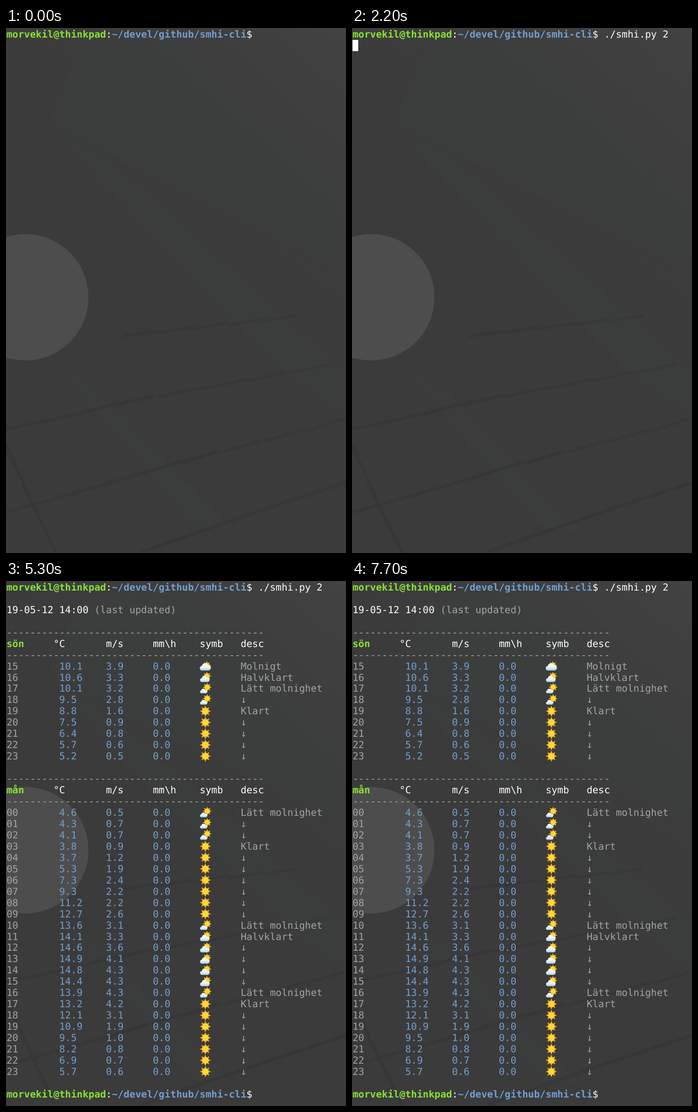
Animation, 602 px wide and 930 px high, one loop 8100 ms. Source, as an HTML page with a canvas:

```html
<!DOCTYPE html>
<html lang="sv">
<head>
<meta charset="utf-8">
<title>Terminal forecast</title>
<style>
html, body { margin: 0; width: 100%; height: 100%; overflow: hidden; background: #3b3c3b; }
canvas { display: block; width: 602px; height: 930px; }
</style>
</head>
<body>
<canvas id="stage" width="602" height="930"></canvas>
<script>
const W = 602, H = 930, LOOP = 8100;
const CELL = 10.36, ROW = 19.955, FONT = '17.2px "DejaVu Sans Mono", monospace';
const GREEN = '#8ae234', BLUE = '#729fcf', WHITE = '#ffffff', GREY = '#a3a3a3';
const ctx = document.getElementById('stage').getContext('2d');

const SKIES = { c: 'Molnigt', h: 'Halvklart', l: 'Lätt molnighet', s: 'Klart' };

// Each entry: temperature, wind, sky
const DAYS = [
  { name: 'sön', row: 4, hour: 15, data:
    '10.1 3.9 c,10.6 3.3 h,10.1 3.2 l,9.5 2.8 l,8.8 1.6 s,7.5 0.9 s,6.4 0.8 s,5.7 0.6 s,5.2 0.5 s' },
  { name: 'mån', row: 17, hour: 0, data:
    '4.6 0.5 l,4.3 0.7 l,4.1 0.7 l,3.8 0.9 s,3.7 1.2 s,5.3 1.9 s,7.3 2.4 s,9.3 2.2 s,' +
    '11.2 2.2 s,12.7 2.6 s,13.6 3.1 l,14.1 3.3 h,14.6 3.6 h,14.9 4.1 h,14.8 4.3 h,14.4 4.3 h,' +
    '13.9 4.3 l,13.2 4.2 s,12.1 3.1 s,10.9 1.9 s,9.5 1.0 s,8.2 0.8 s,6.9 0.7 s,5.7 0.6 s' }
];

const colX = col => 1 + col * CELL;
const rowY = row => 1 + row * ROW;

function put(text, col, row, color, bold) {
  ctx.font = (bold ? 'bold ' : '') + FONT;
  ctx.fillStyle = color;
  [...text].forEach((ch, i) => {
    if (ch !== ' ') ctx.fillText(ch, colX(col + i), rowY(row) + 15.9);
  });
}

function prompt(row) {
  put('morvekil@thinkpad', 0, row, GREEN, true);
  put(':', 17, row, WHITE);
  put('~/devel/github/smhi-cli', 18, row, BLUE, true);
  put('$', 41, row, WHITE);
}

function cursor(col, row) {
  ctx.fillStyle = WHITE;
  ctx.fillRect(Math.floor(colX(col)), Math.round(rowY(row)), col ? 11 : 10, 20);
}

function disc(x, y, r, fill) {
  ctx.fillStyle = fill;
  ctx.beginPath();
  ctx.arc(x, y, r, 0, Math.PI * 2);
  ctx.fill();
}

function sun(x, y, r) {
  ctx.fillStyle = '#f7a823';
  ctx.beginPath();
  for (let i = 0; i < 16; i++) {
    const a = i * Math.PI / 8 - Math.PI / 2, d = i % 2 ? r * 0.56 : r;
    ctx.lineTo(x + d * Math.cos(a), y + d * Math.sin(a));
  }
  ctx.fill();
  disc(x, y, r * 0.56, '#fdd835');
}

function cloud(x, y, s) {
  ctx.save();
  ctx.translate(x, y);
  ctx.scale(s, s);
  const shade = ctx.createLinearGradient(0, -6, 0, 6);
  shade.addColorStop(0, '#ffffff');
  shade.addColorStop(0.55, '#e3f1f9');
  shade.addColorStop(1, '#a9cfe6');
  disc(-5.3, 2, 3.6, shade);
  disc(-0.8, -1, 4.9, shade);
  disc(4.6, 1.3, 4.3, shade);
  ctx.fillRect(-5.3, 1, 10, 4.6);
  ctx.restore();
}

function symbol(sky, row) {
  const x = 353, y = rowY(row) + 10;
  if (sky === 's') return sun(x, y, 10);
  if (sky === 'l') {
    sun(x + 3.2, y - 2.4, 8);
    cloud(x - 3, y + 4.3, 0.72);
  } else if (sky === 'h') {
    sun(x + 2.8, y - 2, 8);
    cloud(x - 1, y + 3, 0.94);
  } else {
    sun(x + 2.5, y - 1.5, 7.5);
    cloud(x, y + 1.6, 1.1);
  }
}

function table({ name, row, hour, data }) {
  const rule = '-'.repeat(44);
  put(rule, 0, row, GREY);
  put(rule, 0, row + 2, GREY);
  put(name, 0, row + 1, GREEN, true);
  put('°C       m/s     mm\\h    symb   desc', 8, row + 1, WHITE);
  let last = '';
  data.split(',').forEach((entry, i) => {
    const [temp, wind, sky] = entry.split(' '), r = row + 3 + i;
    put(String(hour + i).padStart(2, '0'), 0, r, GREY);
    put(temp, 9, r, BLUE);
    put(wind, 17, r, BLUE);
    put('0.0', 25, r, BLUE);
    symbol(sky, r);
    put(sky === last ? '↓' : SKIES[sky], 40, r, GREY);
    last = sky;
  });
}

function path(g, pts) {
  g.beginPath();
  for (let i = 0; i < pts.length; i += 2) g.lineTo(pts[i], pts[i + 1]);
}

// Row of stepped floor seams from (x, y) to (ex, ey)
function seams(g, x, y, ex, ey, n) {
  for (let i = 0; i < n; i++) {
    const a = i / n, b = (i + 0.94) / n;
    g.lineWidth = 4.5 - 2.5 * a;
    path(g, [x + (ex - x) * a, y + (ey - y) * a + 2, x + (ex - x) * b, y + (ey - y) * b - 1]);
    g.stroke();
  }
}

function makeWallpaper() {
  const c = document.createElement('canvas');
  c.width = W;
  c.height = H;
  const g = c.getContext('2d');
  g.fillStyle = '#3b3b3b';
  g.fillRect(0, 0, W, H);
  const glow = g.createLinearGradient(W, 0, 250, 400);
  glow.addColorStop(0, '#424242');
  glow.addColorStop(1, 'rgba(60,60,60,0)');
  g.fillStyle = glow;
  g.fillRect(0, 0, W, H);

  g.filter = 'blur(5px)';
  g.fillStyle = 'rgba(60,64,62,0.55)';
  for (const band of [
    [130, 40, 290, 0, 602, 290, 602, 430, 75, 170],
    [80, 180, 180, 230, 602, 610, 602, 690, 480, 600],
    [75, 585, 170, 650, 400, 890, 330, 880, 240, 770]
  ]) {
    path(g, band);
    g.fill();
  }

  g.filter = 'blur(1px)';
  g.strokeStyle = '#363636';
  seams(g, 208, 544, 520, 510, 5);
  seams(g, 190, 666, 578, 596, 5);
  seams(g, 310, 768, 602, 693, 4);
  g.lineWidth = 4;
  for (const line of [
    [0, 711, 130, 683, 190, 667],
    [0, 858, 170, 810, 312, 767],
    [240, 928, 450, 855, 602, 805],
    [0, 738, 45, 840, 90, 932]
  ]) {
    path(g, line);
    g.stroke();
  }
  g.filter = 'none';

  g.fillStyle = '#4d4d4d';
  g.beginPath();
  g.arc(34, 477, 112, 0, Math.PI * 2);
  g.fill();
  return c;
}

const wallpaper = makeWallpaper();

// Time, screen stage (0 idle, 1 typed, 2 running, 3 output), cursor shown
const STEPS = [
  [0, 0, 0], [400, 1, 1], [1000, 1, 0], [1600, 1, 1], [2200, 2, 1], [3400, 3, 1],
  [4100, 3, 0], [4700, 3, 1], [5300, 3, 0], [6200, 3, 1], [6500, 3, 0], [7100, 3, 1], [7700, 3, 0]
];
const CURSORS = [[42, 0], [54, 0], [0, 1], [43, 45]];

// The command starts one blank cell after the prompt sign
function draw([, stage, lit]) {
  ctx.drawImage(wallpaper, 0, 0);
  prompt(0);
  if (stage > 0) put('./smhi.py 2', 43, 0, WHITE);
  if (stage === 3) {
    put('19-05-12 14:00', 0, 2, WHITE);
    put('(last updated)', 15, 2, GREY);
    DAYS.forEach(table);
    prompt(45);
  }
  if (lit) cursor(...CURSORS[stage]);
}

ctx.textRendering = 'geometricPrecision';
const start = performance.now();
let shown = null;

function tick() {
  const t = (performance.now() - start) % LOOP;
  const step = STEPS.filter(s => s[0] <= t).pop();
  if (step !== shown) draw(shown = step);
  requestAnimationFrame(tick);
}
tick();
</script>
</body>
</html>
```
